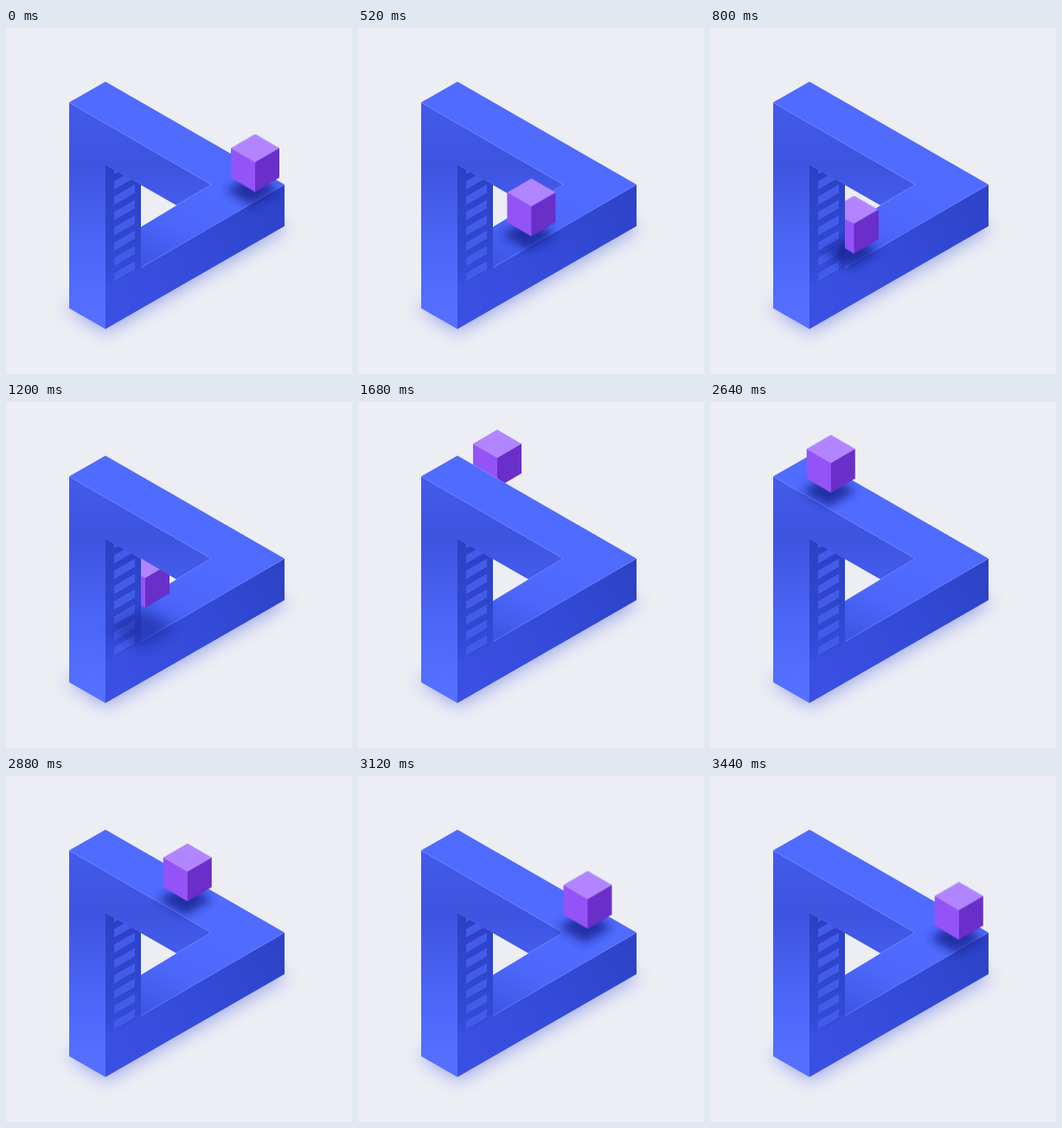
These frames come from a looping animation (400 by 400 pixels, 3480 ms). An HTML page:

```html
<!DOCTYPE html>
<html lang="en">
<head>
<meta charset="utf-8">
<title>Cube on an impossible triangle</title>
<style>
  html, body { margin: 0; width: 100%; height: 100%; overflow: hidden; background: #eceef4; }
  svg, .view { position: absolute; left: 0; top: 0; width: 400px; height: 400px; }

  .view, .cube, .shade, .spread { animation: 3480ms linear infinite; }
  .view { animation-name: hide; animation-timing-function: step-end; }
  .cube { animation-name: travel; }
  .shade { animation-name: follow; }
  .spread { animation-name: spread; }

  /* down the lower bar, up behind the post, forward, down the upper bar */
  @keyframes travel {
    0%, .43% { transform: translate(288px, 122.5px); animation-timing-function: cubic-bezier(.34, 0, .4, 1); }
    28.74% { transform: translate(161px, 197px); animation-timing-function: cubic-bezier(.34, 0, .36, 1); }
    57.47% { transform: translate(161px, 12.5px); animation-timing-function: cubic-bezier(.34, 0, .36, 1); }
    71.84% { transform: translate(128.5px, 31.5px); animation-timing-function: cubic-bezier(.34, 0, .35, 1); }
    100% { transform: translate(288px, 122.5px); }
  }

  /* the shadow stays on the ground while the cube climbs */
  @keyframes follow {
    0%, .43% { transform: translate(288px, 122.5px); animation-timing-function: cubic-bezier(.34, 0, .4, 1); }
    28.74% { transform: translate(161px, 197px); animation-timing-function: step-end; }
    51% { transform: translate(161px, 12.5px); }
    57.47% { transform: translate(161px, 12.5px); animation-timing-function: cubic-bezier(.34, 0, .36, 1); }
    71.84% { transform: translate(128.5px, 31.5px); animation-timing-function: cubic-bezier(.34, 0, .35, 1); }
    100% { transform: translate(288px, 122.5px); }
  }

  @keyframes spread {
    0%, 28.74% { opacity: .8; transform: translate(-3px, 65px) scale(1); }
    34.5% { opacity: .5; transform: translate(-3px, 65px) scale(1.25); }
    43%, 51% { opacity: 0; transform: translate(-3px, 65px) scale(1.4); }
    57.47%, 100% { opacity: .8; transform: translate(-3px, 65px) scale(1); }
  }

  /* parts of the triangle that stand in front of the cube */
  @keyframes hide {
    0% { clip-path: path("M156 0H400V400H156Z"); }
    28.74% { clip-path: path("M0 0H400V226L115 62L73 86H0Z M156 181L400 322V400H156Z"); }
    57.47%, 100% { clip-path: path("M0 0H400V400H0Z"); }
  }
</style>
</head>
<body>
<svg viewBox="0 0 400 400">
  <defs>
    <linearGradient id="top" gradientUnits="userSpaceOnUse" x1="210" y1="165" x2="156" y2="277">
      <stop offset="0" stop-color="#506bff"/>
      <stop offset=".5" stop-color="#4c67fa"/>
      <stop offset="1" stop-color="#3b54e4"/>
    </linearGradient>
    <linearGradient id="front" gradientUnits="userSpaceOnUse" x1="0" y1="86" x2="0" y2="330">
      <stop offset="0" stop-color="#435bea"/>
      <stop offset=".3" stop-color="#3d54e0"/>
      <stop offset=".7" stop-color="#4c67f8"/>
      <stop offset="1" stop-color="#5570ff"/>
    </linearGradient>
    <linearGradient id="side" gradientUnits="userSpaceOnUse" x1="115" y1="320" x2="322" y2="205">
      <stop offset="0" stop-color="#3a50e2"/>
      <stop offset=".5" stop-color="#344bda"/>
      <stop offset="1" stop-color="#2d43c8"/>
    </linearGradient>
    <linearGradient id="inner" gradientUnits="userSpaceOnUse" x1="0" y1="158" x2="0" y2="310">
      <stop offset="0" stop-color="#2b41c4"/>
      <stop offset=".6" stop-color="#3047d0"/>
      <stop offset="1" stop-color="#3047d0" stop-opacity="0"/>
    </linearGradient>
    <filter id="soft" x="-50%" y="-50%" width="200%" height="200%"><feGaussianBlur stdDeviation="10"/></filter>
    <filter id="blur" x="-60%" y="-90%" width="220%" height="280%"><feGaussianBlur stdDeviation="5.5"/></filter>
    <clipPath id="body">
      <path clip-rule="evenodd" d="M73 86L115 62L322 181V229L115 348L73 324Z M156 181L197 205L156 230Z"/>
    </clipPath>
    <clipPath id="wall"><path d="M115 158L156 181V277L115 301Z"/></clipPath>
  </defs>

  <path d="M68 322L115 352L324 233L300 215L115 310Z" fill="#4c5ee0" opacity=".5" filter="url(#soft)"/>

  <path d="M115 158L156 181V277L322 181V229L115 348Z" fill="url(#side)"/>
  <path d="M115 158L156 181V277L115 301Z" fill="url(#inner)"/>
  <g id="rungs" clip-path="url(#wall)" fill="#425cea"></g>
  <path d="M73 86L115 62L322 181L156 277V230L237 181Z" fill="url(#top)"/>
  <path d="M73 86L237 181L197 205L115 158V348L73 324Z" fill="url(#front)"/>
  <path d="M73 86L237 181" stroke="#7f93ff" stroke-opacity=".4" fill="none"/>
  <path d="M156 277L322 181" stroke="#6f86ff" stroke-opacity=".35" fill="none"/>

  <g clip-path="url(#body)">
    <g class="shade">
      <g class="spread">
        <path d="M0 -18L31 0L0 18L-31 0Z" fill="#16238c" filter="url(#blur)"/>
      </g>
    </g>
  </g>
</svg>

<div class="view">
  <svg viewBox="0 0 400 400">
    <g class="cube">
      <path d="M0 0L28 16.2L0 32.5L-28 16.2Z" fill="#b185ff"/>
      <path d="M-28 16.2L0 32.5V67L-28 50.5Z" fill="#9453f6"/>
      <path d="M28 16.2L0 32.5V67L28 50.5Z" fill="#6a2ec9"/>
    </g>
  </svg>
</div>

<script>
  const rungs = document.getElementById("rungs");
  for (let i = 0; i < 8; i++) {
    const rung = document.createElementNS("http://www.w3.org/2000/svg", "path");
    rung.setAttribute("d", `M125 ${293 - i * 17.7}v-9.5l24 -14v9.5z`);
    rungs.append(rung);
  }
</script>
</body>
</html>
```
